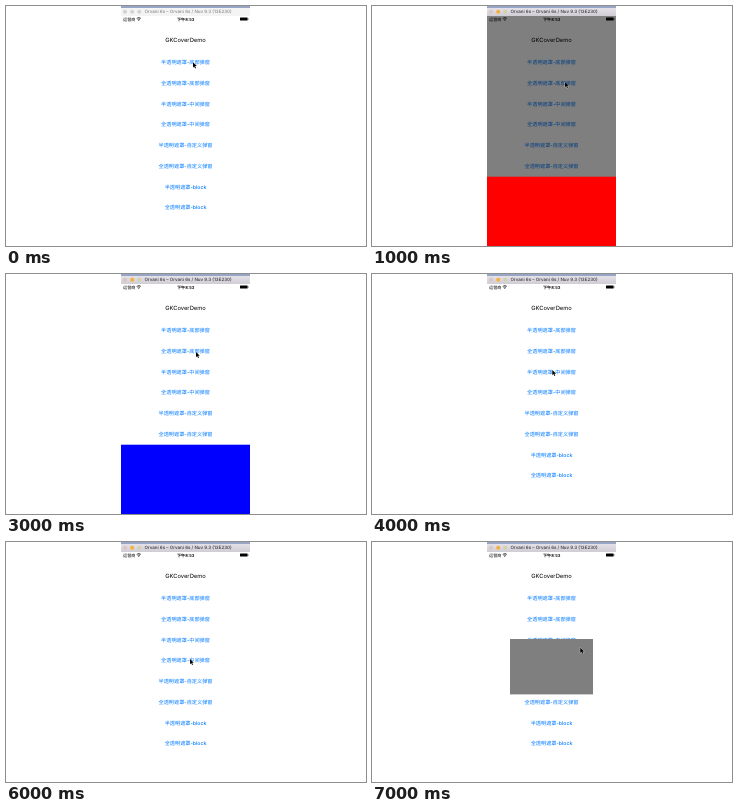
An HTML page that plays this animation: 360x240 px, repeating every 8000 ms.

```html
<!DOCTYPE html>
<html lang="zh">
<head>
<meta charset="utf-8">
<style>
html, body { margin: 0; width: 100%; height: 100%; overflow: hidden; background: #fff; }
svg { display: block; width: 360px; height: 240px; }
text { font-family: Inter, "Noto Sans CJK SC", "Noto Sans CJK", sans-serif; text-anchor: middle; text-rendering: geometricPrecision; }
#menu text { font-size: 5.16px; font-weight: 500; fill: #007aff; }
</style>
</head>
<body>
<svg viewBox="0 0 360 240">
  <defs>
    <linearGradient id="chrome" x2="0" y2="1">
      <stop stop-color="#e4e1e8"/><stop offset="1" stop-color="#d0cdd5"/>
    </linearGradient>
  </defs>

  <g id="status">
    <text x="123.3" y="14.6" font-size="4.15">运营商</text>
    <path d="M130.7 12.4q2.1-1.8 4.2 0M131.6 13.4q1.2-1 2.4 0" fill="none" stroke="#000" stroke-width=".7"/>
    <circle cx="132.8" cy="14.3" r=".5"/>
    <text x="179.7" y="14.6" font-size="4.15" font-weight="600">下午8:53</text>
    <rect x="234" y="11.5" width="7.6" height="3" rx=".5"/>
    <rect x="241.9" y="12.4" width=".5" height="1.2"/>
  </g>
  <text x="179.5" y="35.8" font-size="5.8">GKCoverDemo</text>
  <g id="menu"></g>

  <rect id="dim" x="115" y="10" width="129" height="230"/>
  <rect id="popup"/>

  <rect x="115" width="129" height="2" fill="#98a6c6"/>
  <rect id="bar" x="115" y="2" width="129" height="8"/>
  <g id="lights">
    <circle cx="119" cy="5.7" r="2"/>
    <circle cx="126.2" cy="5.7" r="2"/>
    <circle cx="133.2" cy="5.7" r="2"/>
  </g>
  <text id="caption" x="182" y="7.4" font-size="4.5" font-weight="500">Orvani 6s – Orvani 6s / Nuv 9.3 (13E230)</text>

  <path id="cursor" d="M0 0V5.2L1.2 4.1 2.1 6.1 3 5.7 2.1 3.8H3.8Z" stroke="#fff" stroke-width=".5" paint-order="stroke"/>
</svg>
<script>
const $ = id => document.getElementById(id);
const set = (el, attrs) => Object.entries(attrs).forEach(([k, v]) => el.setAttribute(k, v));

const kinds = ['底部弹窗', '中间弹窗', '自定义弹窗', 'block'];
$('menu').innerHTML = kinds.flatMap(kind => ['半', '全'].map(c => `${c}透明遮罩-${kind}`))
  .map((label, i) => `<text x="179.5" y="${58.2 + i * 20.72}">${label}</text>`).join('');

const bottom = { x: 115, y: 170.7, width: 129, height: 69.3 };
const middle = { x: 138, y: 97, width: 83, height: 55.4 };

// One scene per second; every change is a hard cut.
const scenes = [
  { cursor: [187, 56.3], inactive: true },
  { cursor: [193, 76], dim: .5, box: bottom, fill: '#f00' },
  { cursor: [187.9, 74.3] },
  { cursor: [190, 78], box: bottom, fill: '#00f' },
  { cursor: [180.3, 96] },
  { cursor: [192, 71.3], dim: .1, box: middle, fill: '#1edc05' },
  { cursor: [184, 117] },
  { cursor: [208.3, 105.7], box: middle, fill: '#7f7f7f' }
];

function show({ cursor, dim = 0, box = middle, fill = 'none', inactive }) {
  set($('dim'), { opacity: dim });
  set($('popup'), { ...box, fill });
  set($('cursor'), { transform: `translate(${cursor})` });
  set($('bar'), { fill: inactive ? '#f4f4f4' : 'url(#chrome)' });
  set($('caption'), { fill: inactive ? '#8a8a8a' : '#333' });
  const colors = inactive ? ['#d2d2d2', '#d2d2d2', '#d2d2d2'] : ['#d9c6c2', '#f5b13c', '#d6cfae'];
  [...$('lights').children].forEach((dot, i) => set(dot, { fill: colors[i] }));
}

const start = performance.now();
function tick() {
  const t = (performance.now() - start) % 8000;
  show(scenes[Math.floor(t / 1000)]);
  requestAnimationFrame(tick);
}
tick();
</script>
</body>
</html>
```
